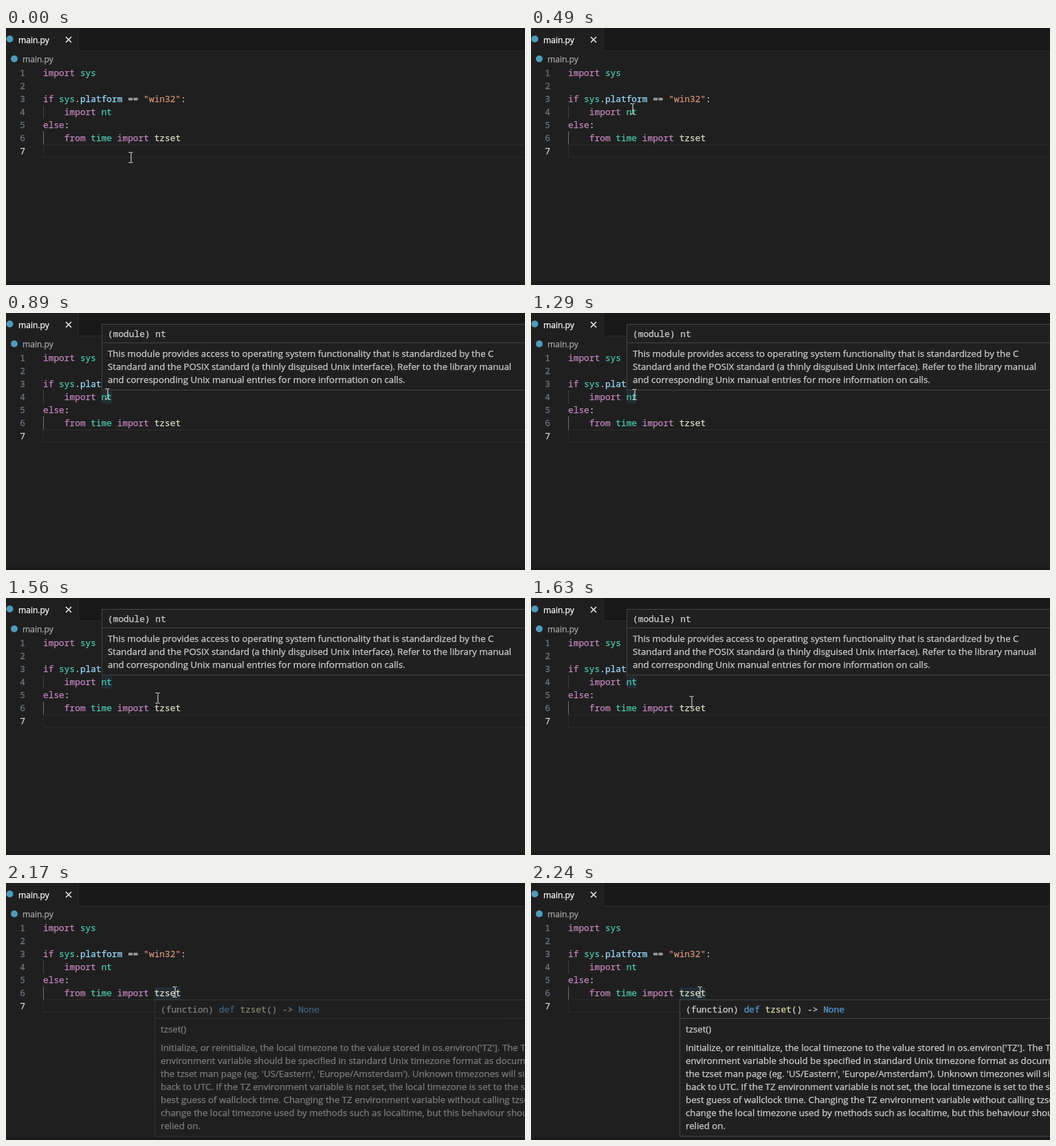
An HTML page that plays this animation: 755 px wide and 375 px high, repeating every 2.64 s.

```html
<!DOCTYPE html>
<html lang="en">
<head>
<meta charset="utf-8">
<title>Editor hover</title>
<style>
  html, body { margin: 0; width: 100%; height: 100%; overflow: hidden; background: #1f1f1f; }
  svg { display: block; width: 755px; height: 375px; }
  text { white-space: pre; }
  text, tspan { fill: currentColor; stroke: currentColor; stroke-width: .25px; }
  .mono { font: 12.83px "Noto Sans Mono", monospace; }
  .ui { font: 13.28px "Open Sans", sans-serif; color: #d0d0d0; }
  .label { font: 12.06px "Open Sans", sans-serif; }
  .tip rect { fill: #202020; stroke: #454545; }
  .tip path { stroke: #454545; }
  .mark { fill: #222c33; }
  .hidden { opacity: 0; }
</style>
</head>
<body>
<svg viewBox="0 0 755 375">
  <rect width="755" height="34" fill="#181818"/>
  <rect width="105" height="34" fill="#1f1f1f"/>
  <path d="M105.5 0V33.5H755" fill="none" stroke="#2b2b2b"/>
  <rect y="371" width="755" height="4" fill="#1a1a1a"/>
  <g fill="#519aba"><circle cx="5.5" cy="16" r="5"/><circle cx="12" cy="45" r="5"/></g>
  <text class="label" x="18" y="22" color="#fff">main.py</text>
  <text class="label" x="24" y="50" color="#a9a9a9">main.py</text>
  <path d="M87 13l8 8m0-8l-8 8" stroke="#fff" stroke-width="1.4"/>
  <rect x="54.5" y="170.5" width="710" height="18" fill="none" stroke="#2c2c2c"/>
  <path d="M54.5 113v19" stroke="#404040"/>
  <path d="M54.5 151v19" stroke="#707070"/>
  <rect id="markNt" class="mark hidden" x="139" y="114" width="15" height="18"/>
  <rect id="markTz" class="mark hidden" x="216" y="152" width="38" height="18"/>
  <g id="code"></g>
  <g id="tipNt" class="tip hidden">
    <rect x="139.5" y="16.5" width="640" height="96"/>
    <path d="M140 43.5H755"/>
  </g>
  <g id="tipTz" class="tip hidden">
    <rect x="216.5" y="170.5" width="560" height="199"/>
    <path d="M217 197.5H755"/>
  </g>
  <g id="pointer" fill="none" shape-rendering="crispEdges">
    <path d="M-3 -7.5h2.5m1 0h2.5M-3 7.5h2.5m1 0h2.5M0 -7v14" stroke="#e8e8e8"/>
  </g>
</svg>
<script>
const LOOP = 2640;
const $ = id => document.getElementById(id);
const COLORS = {
  k: '#c586c0', m: '#4ec9b0', v: '#9cdcfe', s: '#ce9178', p: '#d4d4d4',
  i: '#e0e0c8', d: '#569cd6', f: '#dcdcaa', n: '#6e7681', a: '#d0d0d0'
};

function node(name, parent, attrs, content = '') {
  const el = document.createElementNS('http://www.w3.org/2000/svg', name);
  for (const key in attrs) el.setAttribute(key, attrs[key]);
  el.textContent = content;
  return parent.appendChild(el);
}

// Tokens are written as "<colour key>:<text>" and separated by "|".
function mono(parent, x, y, tokens) {
  const line = node('text', parent, { class: 'mono', x, y });
  for (const token of tokens.split('|'))
    node('tspan', line, { color: COLORS[token[0]] }, token.slice(2));
}

function prose(parent, x, y, lines) {
  lines.forEach((line, i) => node('text', parent, { class: 'ui', x, y: y + 19 * i }, line));
}

[
  'k:import |m:sys',
  'p:',
  'k:if |m:sys|p:.|v:platform|p: == |s:"win32"|p::',
  'k:    import |m:nt',
  'k:else|p::',
  'k:    from |m:time |k:import |i:tzset',
  'p:'
].forEach((tokens, i) => {
  const y = 70 + 19 * i;
  mono($('code'), 20.3, y, (i === 6 ? 'a:' : 'n:') + (i + 1));
  mono($('code'), 54, y, tokens);
});

mono($('tipNt'), 148, 35, 'a:(module) nt');
prose($('tipNt'), 148, 64, [
  'This module provides access to operating system functionality that is standardized by the C',
  'Standard and the POSIX standard (a thinly disguised Unix interface). Refer to the library manual',
  'and corresponding Unix manual entries for more information on calls.'
]);

mono($('tipTz'), 225, 189, 'a:(function) |d:def |f:tzset|a:() -> |d:None');
prose($('tipTz'), 225, 218, ['tzset()']);
prose($('tipTz'), 225, 245, [
  "Initialize, or reinitialize, the local timezone to the value stored in os.environ['TZ']. The TZ",
  'environment variable should be specified in standard Unix timezone format as documented in',
  "the tzset man page (eg. 'US/Eastern', 'Europe/Amsterdam'). Unknown timezones will silently fall",
  'back to UTC. If the TZ environment variable is not set, the local timezone is set to the systems',
  'best guess of wallclock time. Changing the TZ environment variable without calling tzset may',
  'change the local timezone used by methods such as localtime, but this behaviour should not be',
  'relied on.'
]);

// Plays [time, value] steps, holding each value until the next one.
function play(id, prop, steps) {
  const last = steps[steps.length - 1][1];
  const frames = [...steps, [LOOP, last]].map(([time, value]) =>
    ({ offset: time / LOOP, [prop]: value, easing: 'step-end' }));
  return $(id).animate(frames, { duration: LOOP, iterations: Infinity });
}

const path = [
  [0, 181, 189], [70, 178, 187], [140, 164, 172], [210, 145, 148], [280, 130, 125],
  [350, 127, 113], [420, 137, 111], [490, 147, 118],
  [1290, 150, 119], [1360, 164, 124], [1430, 185, 132], [1490, 205, 140],
  [1560, 220, 146], [1630, 233, 151], [1770, 244, 156], [1840, 245, 159]
];

const motions = [
  play('pointer', 'transform', path.map(([t, x, y]) => [t, `translate(${x + .5}px, ${y}px)`])),
  play('tipNt', 'opacity', [[0, 0], [820, .53], [890, 1], [1700, 0]]),
  play('markNt', 'opacity', [[0, 0], [820, 1], [1700, 0]]),
  play('tipTz', 'opacity', [[0, 0], [2170, .53], [2240, 1]]),
  play('markTz', 'opacity', [[0, 0], [2170, 1]])
];
const start = performance.now();
motions.forEach(motion => { motion.startTime = start; });
</script>
</body>
</html>
```
